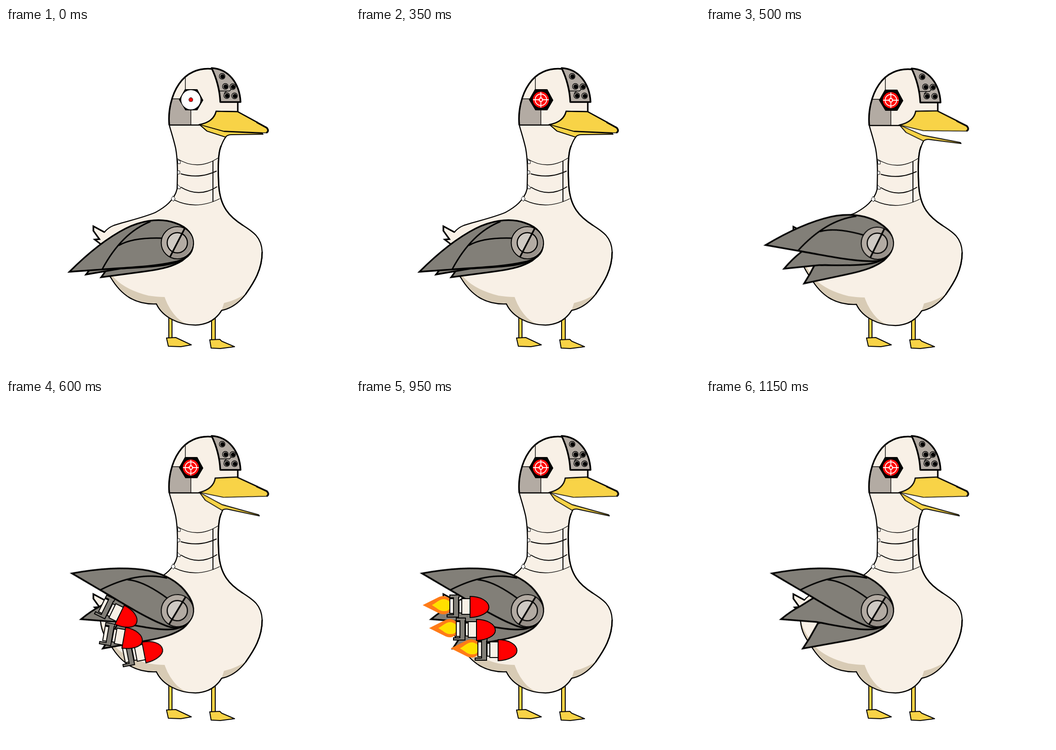
Write an HTML page that moves like this. It is 748x748 px and loops after 1.2 s.

```html
<!DOCTYPE html>
<html lang="en">
<head>
<meta charset="utf-8">
<title>Robot duck</title>
<style>
html, body { margin: 0; width: 100%; height: 100%; overflow: hidden; background: #fff; }
svg { display: block; width: 100vw; height: 100vh; }
.line { fill: none; stroke: #000; }
.ink { stroke: #000; stroke-linejoin: round; }
.skin { fill: #f8f0e6; }
.shade { fill: #d8cbb5; }
.metal { fill: #b3aba3; }
.wing { fill: #827f78; stroke: #000; stroke-width: 3.6; }
.gold { fill: #f8d347; }

/* each segment holds its pose for 50 ms */
.duck, .upper, .mid, .low, .disc, .jaw, .beak, .pupil, .cross, .fly, .aim, .flame {
  animation: 1200ms step-end infinite;
}
.upper, .mid, .low, .disc { transform-origin: 372px 467px; }
.jaw, .beak { transform-origin: 421px 210px; }
.pupil { transform-origin: 402px 156px; }
.flame { transform-origin: -43px -4px; }

.duck { animation-name: bob; }
.upper { --up: 34.6deg; animation-name: swing; }
.mid { --up: 14.1deg; animation-name: swing; }
.low { --up: -2.6deg; animation-name: swing; }
.disc { --up: 3.7deg; animation-name: swing; }
.jaw { animation-name: jaw; }
.beak { animation-name: beak; }
.pupil { animation-name: grow; }
.cross { animation-name: show; }
.fly { animation-name: fly; }
.aim { animation-name: aim; }
.flame { animation-name: burn; }

@keyframes bob {
  0% { transform: translateY(0); }
  29.166% { transform: translateY(0); animation-timing-function: steps(2); }
  37.5% { transform: translateY(11px); animation-timing-function: steps(2); }
  45.833%, 100% { transform: translateY(-9px); }
}
@keyframes swing {
  0% { transform: rotate(0deg); }
  29.166% { transform: rotate(0deg); animation-timing-function: steps(2); }
  37.5% { transform: rotate(-6.3deg); animation-timing-function: steps(2); }
  45.833%, 100% { transform: rotate(var(--up)); }
}
@keyframes jaw {
  0% { transform: rotate(0deg); }
  29.166% { transform: rotate(0deg); animation-timing-function: steps(2); }
  37.5% { transform: rotate(3.4deg); animation-timing-function: steps(2); }
  45.833%, 100% { transform: rotate(12.8deg); }
}
@keyframes beak {
  0% { transform: rotate(0deg); }
  37.5% { transform: rotate(0deg); animation-timing-function: steps(2); }
  45.833%, 100% { transform: rotate(-3.8deg); }
}
@keyframes grow {
  0% { transform: scale(.22); animation-timing-function: steps(7); }
  29.166%, 100% { transform: scale(1); }
}
@keyframes show {
  0% { opacity: 0; animation-timing-function: steps(7); }
  29.166%, 100% { opacity: 1; }
}
@keyframes aim {
  0%, 50% { transform: translate(var(--x), var(--y)) rotate(var(--a)); animation-timing-function: steps(2); }
  58.333%, 100% { transform: translate(0px, 0px) rotate(0deg); }
}
@keyframes burn {
  0%, 58.333% { transform: scale(.35); opacity: 0; }
  62.5% { transform: scale(.35); opacity: .55; animation-timing-function: steps(4); }
  79.166%, 100% { transform: scale(1); opacity: 1; }
}
@keyframes fly {
  0% { transform: translateX(0); opacity: 0; }
  50% { transform: translateX(0); opacity: 1; }
  83.333% { transform: translateX(57px); opacity: 1; }
  87.5% { transform: translateX(229px); opacity: 1; }
  91.666% { transform: translateX(516px); opacity: 1; }
  95.833%, 100% { transform: translateX(917px); opacity: 0; }
}
</style>
</head>
<body>
<svg viewBox="0 0 748 748">
  <defs>
    <path id="body" d="M449 89C418 86 392 98 376 122C360 145 352 180 355 211C359 226 364 240 369 262C374 290 373 320 372 350C366 375 345 390 325 401C297 413 255 422 235 429Q222 434 214 444L190 431L190 441L203 459L193 460L206 470C202 505 215 525 228 543C250 580 280 602 327 600C340 628 375 646 412 646C440 645 458 632 469 614C490 610 507 597 521 579C540 552 557 525 557 487C556 455 537 443 515 429C487 411 465 390 462.5 340C461 310 461 270 468 256Q473 243 478 237L437 224L421 210Q450 205 457 181L504 182L504 150Z"/>
    <g id="bolt">
      <circle r="6.2" class="metal" stroke="#000" stroke-width="1.4"/>
      <circle cx=".6" cy=".4" r="4.6"/>
    </g>
    <g id="fire">
      <path fill="#ff7b17" d="M-103 -4L-67 -22Q-53 -27 -43 -17V9Q-54 20 -67 14Z"/>
      <path fill="#ffe000" d="M-83 -4C-72 -10 -66 -18 -55 -17Q-45 -15 -43 -7V0Q-46 10 -56 9C-66 10 -72 2 -83 -4Z"/>
    </g>
    <g id="rocket" stroke="#000" stroke-width="2">
      <path class="skin" d="M-44 -18H-36V14H-44ZM-24 -15H-18V13H-24ZM-18 -18H0V16H-18Z"/>
      <path fill="#827f78" d="M-44 -26H-24V-20H-25V22H-50V17H-36V-20H-44Z"/>
      <path fill="#f00" d="M0 -23C22 -23 41 -13 41 1C41 13 22 22 0 23Z"/>
    </g>
  </defs>

  <g class="gold ink" stroke-width="2">
    <path d="M354 600H361V674H354Z"/>
    <path d="M349 674L369 673L403 689L380 693L353 692Z"/>
    <path d="M447 610H455V678H447Z"/>
    <path d="M443 678L465 677L469 681L497 693L466 697L446 696Z"/>
  </g>

  <g class="duck">
    <use href="#body" class="skin"/>
    <path class="shade" d="M206 488Q214 518 238 546Q262 570 310 582Q330 585 345 585Q353 610 372 630Q384 641 398 645C365 642 340 625 327 600C280 602 250 580 228 543C215 525 204 507 206 488Z"/>
    <path class="shade" d="M474 598Q498 593 521 578Q500 608 469 614Z"/>
    <path class="metal" d="M362 154H402V211H355Q354 180 362 154Z"/>
    <use href="#body" class="line" stroke-width="2.4" stroke-linejoin="miter"/>
    <path class="line" stroke-width="3.4" d="M449 89C418 86 392 98 376 122C360 145 352 180 355 211M214 444L190 431L190 441L203 459L193 460L206 470"/>
    <path class="line" stroke-width="3" d="M521 579C540 552 557 525 557 487M515 429C487 411 465 390 462.5 340C461 310 461 270 468 256"/>

    <g class="line" stroke-width="1.4">
      <path d="M390 106V138M361 154H384M402 176V211"/>
      <path stroke-width="2.4" d="M355 211H422"/>
      <path d="M372 284Q417 312 462 282M366 374Q414 397 465 371"/>
      <path stroke-width="2" d="M380 317Q420 329 458 311M380 346Q420 370 459 345M450 289V378"/>
      <path stroke-width="1" fill="#fff" d="M373 287L379 289V295H374ZM373 310L378 311V317L373 318ZM373 340L379 346V350L373 349ZM363 365L368 371L364 377L359 372Z"/>
    </g>

    <path class="metal ink" stroke-width="3.6" d="M447 87C484 89 508 120 510 161H466Q464 122 447 87Z"/>
    <path class="line" stroke-width="1.4" d="M464 137H486L490 133M480 137L474 142"/>
    <use href="#bolt" x="470" y="105"/>
    <use href="#bolt" x="477" y="127"/>
    <use href="#bolt" x="493" y="127.5"/>
    <use href="#bolt" x="480" y="147"/>
    <use href="#bolt" x="497" y="147.5"/>
    <path class="line" stroke-width="3" d="M504 161V183"/>

    <path d="M376 156L389 133H416L429 157L416 179H390Z"/>
    <circle cx="402" cy="156" r="21" fill="#fff"/>
    <g class="pupil">
      <circle cx="402" cy="156" r="21.5"/>
      <circle cx="402" cy="156" r="17.5" fill="#f00"/>
      <g class="cross" fill="none" stroke="#fff" stroke-width="1.8">
        <circle cx="402" cy="156" r="12.5"/>
        <circle cx="402" cy="156" r="4"/>
        <path d="M385 156H400M404 156H419M402 139V154M402 158V173"/>
      </g>
    </g>

    <g class="jaw">
      <path fill="#fff" d="M423 210L440 206L500 212V226L474 224Z"/>
      <path class="gold ink" stroke-width="1.8" d="M421 210L437 224L477 237Q482 232 490 232L559 231L557 229L474 225Z"/>
    </g>
    <g class="beak">
      <path class="gold ink" stroke-width="1.6" d="M457 181L504 182L567 217Q573 224 566 228L472 224L421 210Q452 204 457 181Z"/>
      <path class="line" stroke-width="2.6" d="M421 210Q452 204 457 181L504 182L548 206"/>
      <path class="line" stroke-width="3.6" d="M545 205L567 217Q573 224 566 228"/>
    </g>

    <path class="wing low" d="M207 542L222 521L242 489L372 450L404 479Q396 497 383 506C365 517 345 524 297 530Z"/>
    <path class="wing mid" d="M174 536Q190 514 209 497L236 469L372 440L397 493Q380 508 365 511C340 519 280 521 250 523Z"/>
    <g class="upper">
      <path class="wing" d="M138 530C173 495 213 460 260 436C288 422 330 410 368 424C395 433 408 450 407 470C406 492 392 505 360 510C320 519 260 521 209 525Z"/>
      <path class="line" stroke-width="3" d="M209 525C232 482 265 440 314 421M245 473Q275 455 340 457"/>
    </g>
    <g class="disc">
      <circle cx="372.5" cy="467" r="35" class="metal"/>
      <path fill="#99928b" d="M388.5 436A35 35 0 0 1 356.5 498Z"/>
      <circle cx="372.5" cy="467" r="35" class="line" stroke-width="2"/>
      <circle cx="372.5" cy="467" r="22" fill="#cfcac4"/>
      <path class="metal" d="M382.6 447.4A22 22 0 0 1 362.4 486.6Z"/>
      <circle cx="372.5" cy="467" r="22" class="line" stroke-width="2.4"/>
      <path class="line" stroke-width="3.6" d="M388.5 436L356.5 498"/>
    </g>
  </g>

  <g class="fly">
    <g transform="translate(309 544)">
      <g class="aim" style="--x:-9px;--y:5px;--a:-11deg">
        <use href="#fire" class="flame"/><use href="#rocket"/>
      </g>
    </g>
    <g transform="translate(248 450)">
      <g class="aim" style="--x:-1px;--y:17px;--a:26deg">
        <use href="#fire" class="flame"/><use href="#rocket"/>
      </g>
    </g>
    <g transform="translate(262 500)">
      <g class="aim" style="--x:-6px;--y:17px;--a:10deg">
        <use href="#fire" class="flame"/><use href="#rocket"/>
      </g>
    </g>
  </g>
</svg>
</body>
</html>
```
